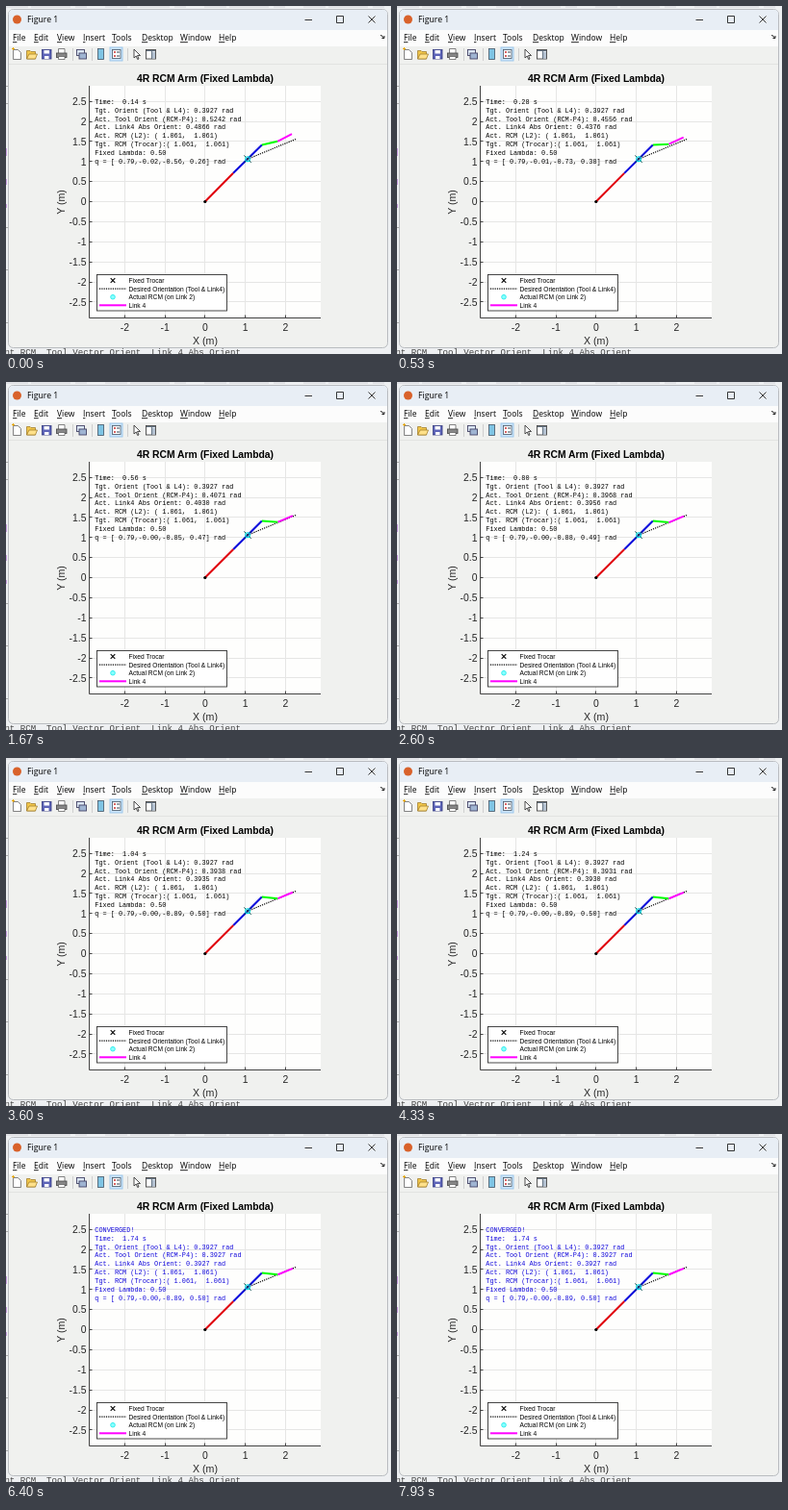
An HTML page for the animation above (8 s loop, 400x362 px).

```html
<!DOCTYPE html>
<html lang="en">
<head>
<meta charset="utf-8">
<title>4R RCM Arm</title>
<style>
html, body { margin: 0; width: 100%; height: 100%; overflow: hidden; background: #eef0f2; }
svg { display: block; width: 400px; height: 362px; }
text { white-space: pre; font-family: "Liberation Sans", Arial, sans-serif; fill: #262626; }
.ui text { font-family: "Open Sans", "Noto Sans", sans-serif; fill: #000; }
.code text { font: 9.1px "Liberation Mono", monospace; fill: #444; }
#info text { font: 6.87px "Liberation Mono", monospace; fill: inherit; }
#legend text { font-size: 6.65px; fill: #000; }
.mid { text-anchor: middle; }
.end { text-anchor: end; }
.arm { fill: none; stroke-width: 2; }
.dots { stroke: #000; stroke-width: 1.2; stroke-dasharray: 1.2 1.1; }
</style>
</head>
<body>
<svg viewBox="0 0 400 362">
  <defs>
    <path id="cross" d="M-2.3-2.3 2.3 2.3M-2.3 2.3 2.3-2.3" stroke="#000" stroke-width="1.1"/>
  </defs>

  <!-- editor behind the window -->
  <g class="code">
    <rect width="400" height="362" fill="#eef0f2"/>
    <path d="M0 1H400" stroke="#d4d4da" stroke-dasharray="23 3 41 5 12 19"/>
    <path d="M0 83.5H2M0 101.5H2M0 230.5H2M0 274.5H2M0 329.5H2" stroke="#aaa"/>
    <path d="M.5 148V156M.5 180V186M.5 206V210" stroke="#c8a0e0"/>
    <text x="-1.6" y="363">nt RCM, Tool Vector Orient, Link 4 Abs Orient</text>
  </g>

  <!-- window frame, menu and toolbar -->
  <g class="ui">
    <rect x="2.5" y="3.5" width="394" height="352" rx="5" fill="#f0f1ef" stroke="#b9bcc0"/>
    <path d="M3 26V8Q3 4 7 4H392Q396 4 396 8V26Z" fill="#e8eef5"/>
    <rect x="3" y="25" width="393" height="17" fill="#fcfcfc"/>
    <path d="M3 60.5H396" stroke="#e2e3e1"/>
    <circle cx="11.5" cy="14" r="4.5" fill="#d9622b"/>
    <text x="22" y="17.3" font-size="8.7">Figure 1</text>
    <path d="M310.5 14.5H318M343.5 10.5H350.5V17.5H343.5ZM376.5 10.5 383.5 17.5M383.5 10.5 376.5 17.5" fill="none" stroke="#222" stroke-width=".9"/>
    <g id="menu" font-size="8.5"></g>
    <path d="M389 30.5Q391.5 30.5 392.5 33.5M390.5 33.5H393V31" fill="none" stroke="#222"/>
    <path d="M69.5 44V57M89.5 44V57M126.5 44V57" stroke="#cfcfcf"/>
    <path d="M7.5 45.5H12.5L15.5 48.5V55.5H7.5Z" fill="#fff" stroke="#666" stroke-width=".8"/>
    <path d="M6 44.5H9M7.5 43V46" stroke="#e6a817"/>
    <path d="M21.5 55V46.5H25L26 47.5H30.5V55Z" fill="#f0c54a" stroke="#9a7420" stroke-width=".7"/>
    <path d="M21.5 55 24 50H32.5L30.5 55Z" fill="#ffe18a" stroke="#9a7420" stroke-width=".7"/>
    <rect x="37.5" y="45.5" width="9.5" height="9.5" fill="#5d64b8" stroke="#353b80" stroke-width=".8"/>
    <path d="M39.5 46H45V49.5H39.5ZM40 52H44.5V55H40Z" fill="#fff"/>
    <path d="M54.5 49V44.5H61V49" fill="#fff" stroke="#666" stroke-width=".8"/>
    <rect x="52.5" y="49" width="10.5" height="4.5" fill="#888" stroke="#444" stroke-width=".8"/>
    <path d="M54.5 52.5H61V55.5H54.5Z" fill="#fff" stroke="#555" stroke-width=".7"/>
    <rect x="73.5" y="45.5" width="8" height="6" fill="#dde8f6" stroke="#446" stroke-width=".9"/>
    <rect x="76" y="49" width="7.5" height="6" fill="#9fb4d2" stroke="#446" stroke-width=".9"/>
    <rect x="95.5" y="44.5" width="6" height="11" fill="#7fc4e4" stroke="#456" stroke-width=".8"/>
    <rect x="108" y="43" width="13" height="14" fill="#cce4f8" stroke="#8fc0ea" stroke-width=".8"/>
    <rect x="110.5" y="45.5" width="8.5" height="9" fill="#fff" stroke="#456" stroke-width=".8"/>
    <path d="M112 48H114M112 52H114" stroke="#c33" stroke-width="1.6"/>
    <path d="M115 48H118M115 52H118" stroke="#345"/>
    <path d="M133 45V54L135.2 52 136.7 55.5 138 55 136.5 51.5H139.5Z" fill="#fff" stroke="#222" stroke-width=".8"/>
    <rect x="145.5" y="45.5" width="10" height="9.5" fill="#fff" stroke="#444" stroke-width=".9"/>
    <path d="M146 46.5H155M151.5 47V55" stroke="#567" stroke-width=".9"/>
    <path d="M152 47.5H155V54.5H152Z" fill="#b4c2d2"/>
  </g>

  <!-- axes -->
  <rect x="86" y="83" width="241" height="241" fill="#fefefd"/>
  <g id="grid" font-size="10.4"></g>
  <path d="M86.5 83V324.5H327" fill="none" stroke="#444"/>
  <text class="mid" x="207" y="78.5" font-size="10.35" font-weight="bold" style="fill:#000">4R RCM Arm (Fixed Lambda)</text>
  <text class="mid" x="207" y="351.5" font-size="10.6">X (m)</text>
  <text class="mid" transform="translate(61 204)rotate(-90)" font-size="10.6">Y (m)</text>

  <!-- arm -->
  <path id="target" class="dots"/>
  <g id="arm"></g>
  <circle cx="206.8" cy="203.5" r="1.6"/>
  <g id="trocar">
    <path d="M-3.7-3.7 3.7 3.7M-3.7 3.7 3.7-3.7" stroke="#044" stroke-width="1"/>
    <circle r="2.4" fill="none" stroke="#0dd" stroke-width="1.1"/>
  </g>
  <g id="info"></g>

  <g id="legend">
    <rect x="94.5" y="279.5" width="135" height="37.5" fill="#fff" stroke="#333" stroke-width=".9"/>
    <use href="#cross" x="111" y="285.5"/>
    <path class="dots" d="M97 294.2H125"/>
    <circle cx="111" cy="302.7" r="2.3" fill="#8ff" stroke="#3ee"/>
    <path d="M97 311.3H125" stroke="#f0f" stroke-width="2"/>
    <text x="127.5" y="287.9">Fixed Trocar</text>
    <text x="127.5" y="296.6">Desired Orientation (Tool &amp; Link4)</text>
    <text x="127.5" y="305.2">Actual RCM (on Link 2)</text>
    <text x="127.5" y="313.8">Link 4</text>
  </g>
</svg>
<script>
const $ = id => document.getElementById(id);
const LOOP = 8000, STEP = 79, LEAD = 28, LAST = 80;
const GOAL = Math.PI / 8, RCM = 1.5 * Math.SQRT1_2;
const LENGTHS = [1, 1, 0.4, 0.4];
const px = x => 206.8 + 41.75 * x, py = y => 203.5 - 41.75 * y;

function add(parent, tag, attrs, text = "") {
  const el = document.createElementNS("http://www.w3.org/2000/svg", tag);
  for (const k in attrs) el.setAttribute(k, attrs[k]);
  el.textContent = text;
  return parent.appendChild(el);
}

const menu = { File: 7, Edit: 29, View: 53, Insert: 80, Tools: 110, Desktop: 141, Window: 181, Help: 221 };
for (const name in menu) {
  const label = add($("menu"), "text", { x: menu[name], y: 36.3 });
  add(label, "tspan", { "text-decoration": "underline" }, name[0]);
  add(label, "tspan", {}, name.slice(1));
}

function gridLine(d, tick) {
  add($("grid"), "path", { d, stroke: "#e6e6e5" });
  add($("grid"), "path", { d: tick, stroke: "#444" });
}
for (let x = -2; x <= 2; x++) {
  const p = Math.floor(px(x)) + 0.5;
  gridLine(`M${p} 83V324`, `M${p} 324V321.5`);
  add($("grid"), "text", { x: px(x), y: 338, class: "mid" }, x);
}
for (let y = -2.5; y <= 2.5; y += 0.5) {
  const p = Math.floor(py(y)) + 0.5;
  gridLine(`M87 ${p}H327`, `M87 ${p}H89.5`);
  add($("grid"), "text", { x: 83.5, y: py(y) + 3.8, class: "end" }, y);
}

const reach = 1.31;
$("target").setAttribute("d", `M${px(RCM)} ${py(RCM)}L${px(RCM + reach * Math.cos(GOAL))} ${py(RCM + reach * Math.sin(GOAL))}`);
$("trocar").setAttribute("transform", `translate(${px(RCM)} ${py(RCM)})`);
const links = ["#e0000c", "#0808dc", "#0f0", "#f0f"].map(stroke => add($("arm"), "path", { class: "arm", stroke }));
const rows = Array.from({ length: 9 }, (_, i) => add($("info"), "text", { x: 92.3, y: 101.6 + 8.95 * i }));

function draw(ms) {
  const n = Math.min(LAST, Math.floor((ms + LEAD) / STEP));
  const done = n === LAST;
  const err = 0.9 ** n; // every control step removes a tenth of the error
  const q = [0.7854 + 0.007 * err, -0.0155 * err, -0.8915 + 0.336 * err, 0.4988 - 0.24 * err];

  let x = 0, y = 0, angle = 0;
  links.forEach((link, i) => {
    const start = `M${px(x)} ${py(y)}`;
    angle += q[i];
    x += LENGTHS[i] * Math.cos(angle);
    y += LENGTHS[i] * Math.sin(angle);
    link.setAttribute("d", `${start}L${px(x)} ${py(y)}`);
  });

  const rad = a => a.toFixed(4) + " rad";
  const point = "( 1.061,  1.061)";
  const lines = [
    `Time:  ${(0.14 + 0.02 * n).toFixed(2)} s`,
    `Tgt. Orient (Tool & L4): ${rad(GOAL)}`,
    `Act. Tool Orient (RCM-P4): ${rad(GOAL + 0.1315 * err)}`,
    `Act. Link4 Abs Orient: ${rad(GOAL + 0.0939 * err)}`,
    `Act. RCM (L2): ${point}`,
    `Tgt. RCM (Trocar):${point}`,
    "Fixed Lambda: 0.50",
    `q = [${q.map(v => v.toFixed(2).padStart(5)).join(",")}] rad`
  ];
  if (done) lines.unshift("CONVERGED!");
  rows.forEach((row, i) => row.textContent = lines[i] || "");
  $("info").style.fill = done ? "#1208dc" : "#000";
}

const begin = performance.now();
function frame() {
  draw((performance.now() - begin) % LOOP);
  requestAnimationFrame(frame);
}
frame();
</script>
</body>
</html>
```
